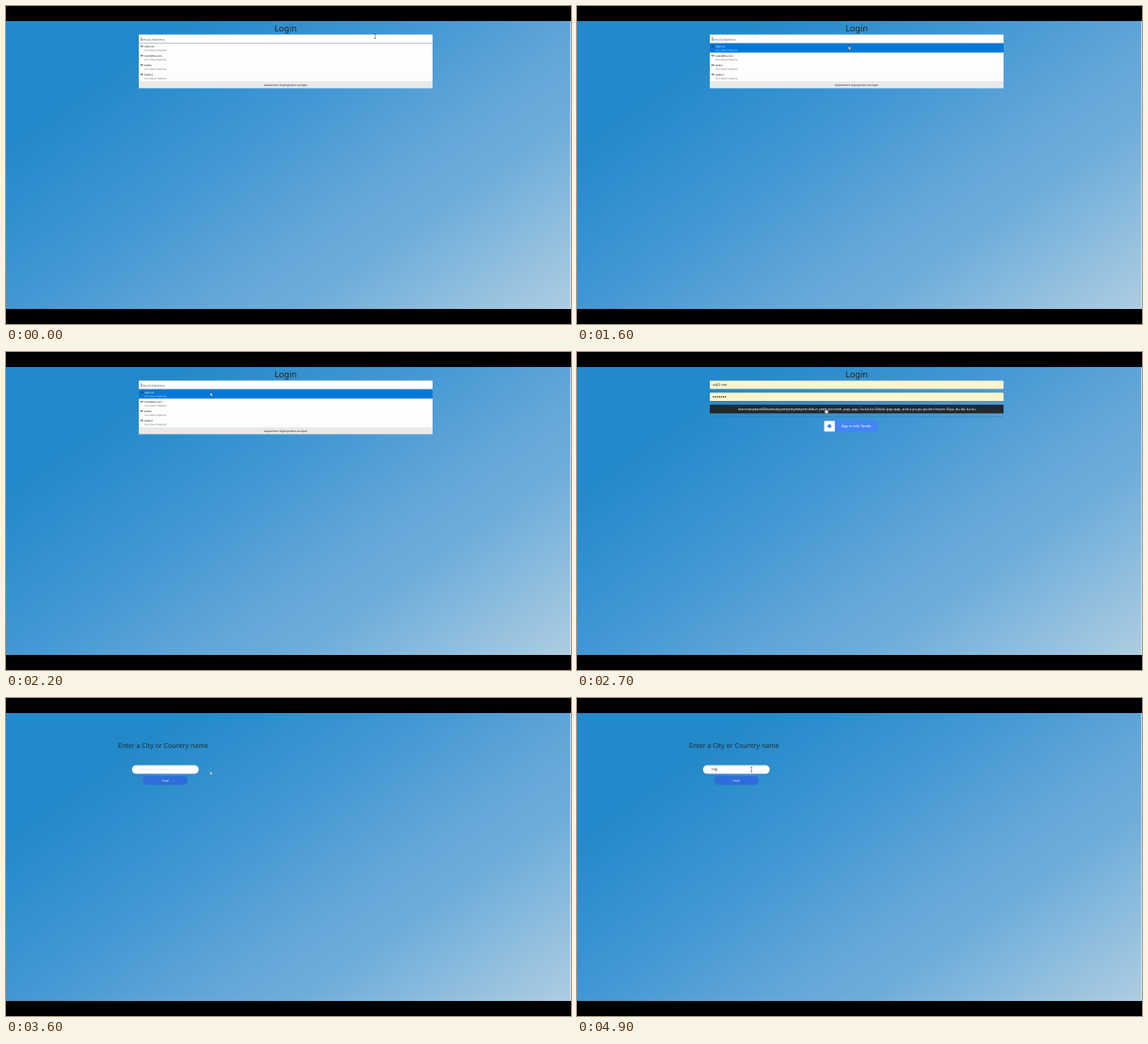
Recreate the animation shown at these times as an HTML page. Size 600 px wide and 338 px high, loop 5000 ms.

```html
<!DOCTYPE html>
<html lang="en">
<head>
<meta charset="utf-8">
<title>Login</title>
<style>
  html, body { margin: 0; width: 100%; height: 100%; overflow: hidden; background: #000; }
  svg { display: block; width: 600px; height: 338px; }
  text { font: 3.76px "Noto Sans", "Open Sans", sans-serif; text-rendering: geometricPrecision; white-space: pre; }
  .mid { text-anchor: middle; }
  .small { font-size: 2.62px; }
</style>
</head>
<body>
<svg viewBox="0 0 600 338">
  <defs>
    <linearGradient id="sky" gradientUnits="userSpaceOnUse" x1="0" y1="16" x2="341" y2="503">
      <stop offset=".18" stop-color="#2289ca"/>
      <stop offset=".42" stop-color="#4297d3"/>
      <stop offset=".62" stop-color="#63a7d9"/>
      <stop offset=".72" stop-color="#6eadda"/>
      <stop offset="1" stop-color="#adcde2"/>
    </linearGradient>
  </defs>
  <rect y="16" width="600" height="306" fill="url(#sky)"/>
  <rect x="599" y="16" width="1" height="306" fill="#e8eff5" fill-opacity=".7"/>

  <g id="login">
    <text class="mid" x="297" y="26.6" style="font-size:9.2px" fill="#212529">Login</text>
    <g id="choose">
      <rect x="141" y="30.4" width="312" height="9" fill="#fff"/>
      <text x="144" y="36.5" fill="#6c757d">Email Address</text>
      <path id="caret" d="M143.7 32.8v4.4" stroke="#333" stroke-width=".4"/>
      <rect x="141" y="39.4" width="312" height="47.8" fill="#fdfdfd"/>
      <path d="M141 39.5h312" stroke="#a8a8a8" stroke-width=".5"/>
      <rect x="141" y="80" width="312" height="7.2" fill="#e9e9ea"/>
      <text class="mid small" x="297" y="84.7" fill="#111">Gespeicherte Zugangsdaten anzeigen</text>
      <g id="rows"></g>
    </g>
    <g id="filled">
      <rect x="141" y="30.4" width="312" height="8.9" rx=".8" fill="#fdf5cb"/>
      <text x="144" y="36.4" fill="#343a40">vi@2.net</text>
      <rect x="141" y="43.2" width="312" height="8.9" rx=".8" fill="#fdf5cb"/>
      <path d="M145 47.8h13" stroke="#222" stroke-width="1.5" stroke-linecap="round" stroke-dasharray="0 2.1"/>
      <rect id="submit" x="141" y="56" width="312" height="9.2" rx=".8"/>
      <text class="mid" x="297.3" y="61.9" fill="#f4f4f4">learnsdopkwoklllwolesdyyeelyeetyeetyeet belun yeee skrrrahh, pap, pap, ka-ka-ka Skibiki-pap-pap, and a pu-pu-pudrrr-boom Skya, du-du-ku-ku</text>
      <path d="M141 68.7h312" stroke="#2a6b9c" stroke-opacity=".55" stroke-width=".5"/>
      <rect x="262" y="72.7" width="57.2" height="12.3" rx=".5" fill="#4285f4"/>
      <rect x="262.5" y="73.2" width="11.3" height="11.3" rx=".4" fill="#fff"/>
      <circle cx="268.1" cy="78.8" r="2" fill="#4285f4"/>
      <text class="mid" x="296.5" y="80.1" style="font-family:Roboto,sans-serif;font-size:3.8px" fill="#fff">Sign in with Tavelo</text>
    </g>
  </g>

  <g id="search">
    <text x="119" y="53.1" style="font-size:7.05px;font-weight:500" fill="#212a31">Enter a City or Country name</text>
    <rect x="133.8" y="71.4" width="70.8" height="9.1" rx="4.5" fill="#fff"/>
    <text id="query" x="143" y="77.4"></text>
    <path id="queryCaret" d="M0 73.8v4.6" stroke="#222" stroke-width=".45"/>
    <rect x="145.4" y="83" width="47.6" height="9.2" rx="4.5" fill="#2f6dda"/>
    <text class="mid" x="169.2" y="88.8" style="font-size:3.5px" fill="#e4edfb">Hop!</text>
  </g>

  <g id="cursor">
    <path id="arrow" d="M-.9-1.7v3.5l.8-.7.6 1.2.7-.3-.6-1.2h1.2z" fill="#fff" stroke="#222" stroke-opacity=".7" stroke-width=".3"/>
    <path id="beam" d="M-.9-2.5h1.8M0-2.5v5M-.9 2.5h1.8" fill="none" stroke="#333" stroke-width=".5"/>
    <path id="hand" d="M-.4-2.2q.5-.7 1 0v1.5l1.9.5q.5.2.4 1l-.4 1.9h-2.5l-1.5-2q.2-.7 1.1-.1z" fill="#fff" stroke="#222" stroke-width=".3"/>
  </g>
</svg>
<script>
const $ = id => document.getElementById(id);
const show = (id, on) => $(id).style.display = on ? "" : "none";

$("rows").innerHTML = ["vi@2.net", "tosk3@lira.com", "Kolibo", "Kolibo1"].map((name, i) => {
  const y = 39.7 + i * 10;
  return `<g>
    <rect x="141" y="${y}" width="312" height="9.8" fill="none"/>
    <path d="M142.3 ${y + 3}h2v.8m-1-.8v.6" fill="none" stroke="#333" stroke-width=".5"/>
    <circle cx="144.9" cy="${y + 3}" r=".6" fill="none" stroke="#333" stroke-width=".5"/>
    <text class="small" x="147" y="${y + 4}">${name}</text>
    <text class="small" x="147" y="${y + 8.2}">Von dieser Website</text></g>`;
}).join("");
const rows = [...$("rows").children];

// time, x, y of the pointer's centre
const path = [
  [0, 392, 32], [1000, 375.5, 44], [2100, 217.7, 44.7], [2300, 218, 45], [2700, 264, 62.5],
  [3100, 283.5, 63.7], [3600, 217.7, 79.7], [4100, 185.3, 76], [5000, 185.3, 76]
];

function pointer(t) {
  const i = path.findIndex(p => p[0] > t);
  const [t0, x0, y0] = path[i - 1], [t1, x1, y1] = path[i];
  const k = (t - t0) / (t1 - t0);
  return [x0 + (x1 - x0) * k, y0 + (y1 - y0) * k];
}

function draw(t) {
  const [x, y] = pointer(t);
  const onSearch = t >= 3100, filled = t >= 2300;
  show("login", !onSearch);
  show("search", onSearch);
  show("choose", !filled);
  show("filled", filled);
  show("caret", t % 667 < 334);

  rows.forEach((row, i) => {
    const lit = i === 0 && t >= 1100;
    const [box, , , name, note] = row.children;
    box.setAttribute("fill", lit ? "#0078d7" : "none");
    name.setAttribute("fill", lit ? "#fff" : "#111");
    note.setAttribute("fill", lit ? "#b5d8f5" : "#777");
  });

  const onSubmit = filled && !onSearch && y > 56;
  $("submit").setAttribute("fill", onSubmit ? "#23272b" : "#343a40");

  const typed = t >= 4900 ? "Ha" : t >= 4700 ? "H" : "";
  $("query").textContent = typed || "Search City name...";
  $("query").setAttribute("fill", typed ? "#333" : "#dfe1e4");
  $("queryCaret").setAttribute("transform", `translate(${143 + typed.length * 2.6})`);
  show("queryCaret", t >= 4200 && (typed || t % 667 < 334));

  const inField = onSearch ? x < 204 && y < 80.5 : !filled && y < 39;
  show("beam", inField);
  show("hand", onSubmit);
  show("arrow", !inField && !onSubmit);
  $("cursor").setAttribute("transform", `translate(${x} ${y})`);
}

function tick() {
  draw(Math.floor(performance.now() % 5000 / 100) * 100);
  requestAnimationFrame(tick);
}
tick();
</script>
</body>
</html>
```
